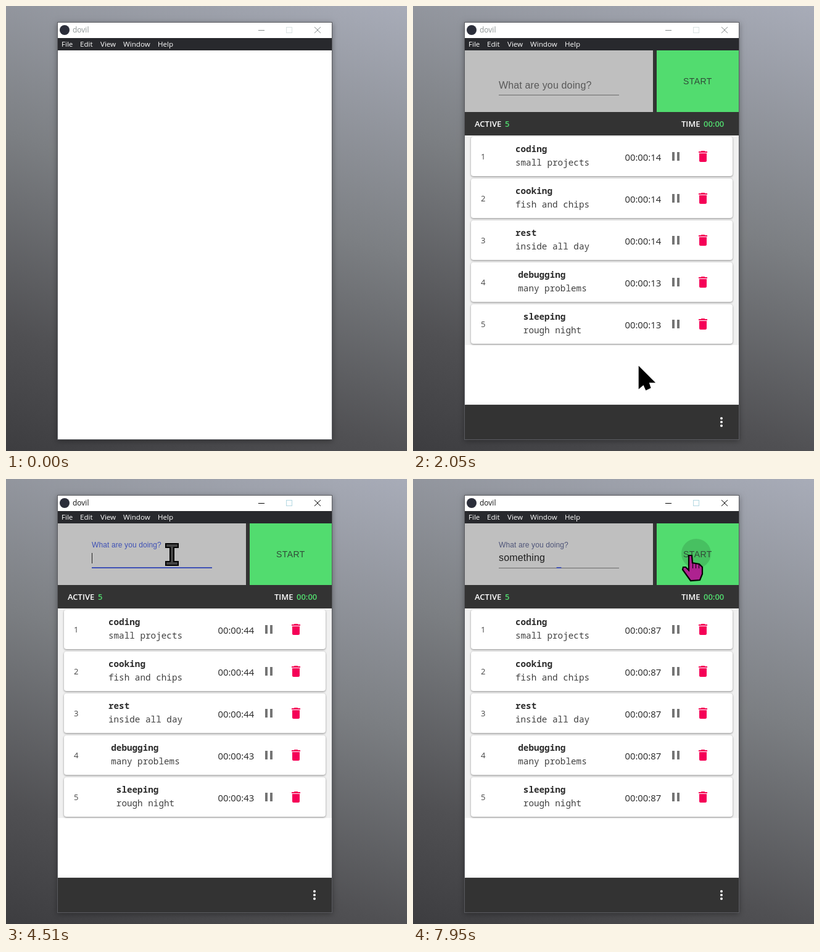
Animation, 650 px wide and 722 px high, one loop 7.99 s. Source, as an HTML page with a canvas:

```html
<!DOCTYPE html>
<html lang="en">
<head>
<meta charset="utf-8">
<title>Time tracker</title>
<style>
html, body { margin: 0; width: 100%; height: 100%; overflow: hidden; background: #6b6c70; }
canvas { display: block; width: 650px; height: 722px; }
</style>
</head>
<body>
<canvas id="stage" width="650" height="722"></canvas>
<script>
const LOOP = 7990;
const ctx = document.getElementById('stage').getContext('2d');
const UI = '"Open Sans", "Noto Sans", sans-serif';
const ARIAL = '"Liberation Sans", Arial, sans-serif';
const MONO = '"Noto Sans Mono", "DejaVu Sans Mono", monospace';
const WIN = { x: 84, y: 27, w: 444, h: 676 };
const CHAR = 8.58;

// Times of the user's actions
const FOCUS = 4150, TYPE = 4880, KEY_GAP = 210, BLUR = 7790;

const tasks = [
  ['coding', 'small projects'],
  ['cooking', 'fish and chips'],
  ['rest', 'inside all day'],
  ['debugging', 'many problems'],
  ['sleeping', 'rough night']
];

// Pointer stops: time, x, y
const stops = [
  [1100, 644, 740], [1210, 626, 710], [2050, 366, 584], [2900, 196, 290], [3330, 260, 149],
  [3500, 269, 123], [6600, 269, 123], [7210, 490, 0], [7300, 538, 56], [7750, 449, 123]
];

const clamp = v => Math.max(0, Math.min(1, v));
const lerp = (a, b, k) => a + (b - a) * k;
const easeOut = v => 1 - (1 - clamp(v)) ** 2;
const mix = (a, b, k) => `rgb(${a.map((v, i) => Math.round(lerp(v, b[i], k))).join(',')})`;
const grey = v => mix([v, v, v], [v, v, v], 0);

function rect(x, y, w, h, color) {
  ctx.fillStyle = color;
  ctx.fillRect(x, y, w, h);
}

function text(str, x, y, font, color, spacing = 0) {
  ctx.font = font;
  ctx.letterSpacing = spacing + 'px';
  ctx.fillStyle = color;
  ctx.fillText(str, x, y);
}

function line(color, x1, y1, x2, y2) {
  ctx.strokeStyle = color;
  ctx.lineWidth = 1;
  ctx.beginPath();
  ctx.moveTo(x1, y1);
  ctx.lineTo(x2, y2);
  ctx.stroke();
}

function disc(x, y, r, color) {
  ctx.fillStyle = color;
  ctx.beginPath();
  ctx.arc(x, y, r, 0, 7);
  ctx.fill();
}

function shape(pts, fill, stroke) {
  ctx.beginPath();
  pts.forEach(p => ctx.lineTo(...p));
  ctx.closePath();
  ctx.fillStyle = fill;
  ctx.fill();
  if (!stroke) return;
  ctx.strokeStyle = '#000';
  ctx.lineWidth = stroke;
  ctx.stroke();
}

function shadow(color, blur, dy) {
  ctx.shadowColor = color;
  ctx.shadowBlur = blur;
  ctx.shadowOffsetY = dy;
}
const noShadow = () => shadow('transparent', 0, 0);

function drawDesktop() {
  const g = ctx.createLinearGradient(650, 0, 389, 841);
  g.addColorStop(0, '#a8acb8');
  g.addColorStop(0.44, '#7c7f83');
  g.addColorStop(0.79, '#505053');
  g.addColorStop(1, '#3d3d40');
  rect(0, 0, 650, 722, g);
}

function drawWindow(active) {
  shadow('rgba(0,0,0,.35)', 9, 2);
  rect(WIN.x - 1, WIN.y - 1, WIN.w + 2, WIN.h + 2, '#5a5b60');
  noShadow();
  rect(WIN.x, WIN.y, WIN.w, WIN.h, '#fff');
  disc(95, 39, 8, '#2b2e3a');
  text('dovil', 108, 43, '12px ' + UI, active ? '#111' : '#8d9494');
  const ink = active ? '#000' : '#858b8b';
  line(ink, 409, 39.5, 419, 39.5);
  line(ink, 500, 34, 510, 44);
  line(ink, 510, 34, 500, 44);
  ctx.strokeStyle = active ? '#b4d8e2' : '#d9e2e2';
  ctx.strokeRect(454.5, 34.5, 9, 9);
  rect(84, 52, 444, 20, '#28292d');
  let x = 90;
  for (const item of ['File', 'Edit', 'View', 'Window', 'Help']) {
    text(item, x, 66, '11.6px ' + UI, '#fff');
    x += Math.round(ctx.measureText(item).width) + 12;
  }
}

function drawField(t) {
  const focus = easeOut((t - FOCUS) / 200);
  const blur = clamp((t - BLUR) / 200);
  const size = 16 - 4 * focus;
  const color = mix([88, 88, 88], [63, 81, 181], focus * (1 - blur * 0.8));
  text('What are you doing?', 139, 134 - 23 * focus, `${size}px ${ARIAL}`, color, size * 0.0094);

  const hover = t > 3450 && t < FOCUS;
  rect(139, hover ? 143 : 144, 195, hover ? 2 : 1, hover ? '#222' : '#6b6b6b');
  const span = 195 * focus * (1 - easeOut(blur));
  rect(236.5 - span / 2, 143, span, 2, '#3f51b5');

  const count = Math.max(0, Math.min(9, 1 + Math.floor((t - TYPE) / KEY_GAP)));
  const word = 'something'.slice(0, count);
  text(word, 139, 133, '16px ' + ARIAL, '#1f1f1f', 0.15);
  const idle = t - (count ? TYPE + (count - 1) * KEY_GAP : FOCUS);
  if (t >= FOCUS && t < BLUR && idle % 1060 < 530)
    rect(139 + Math.round(ctx.measureText(word).width), 120, 1, 17, '#222');
}

function drawHeader(t) {
  rect(84, 72, 444, 138, '#333');
  rect(84, 72, 305, 100, '#bfbfbf');
  rect(395, 72, 133, 100, '#52dc6f');
  drawField(t);
  disc(459, 121, 24 * easeOut((t - BLUR) / 150), 'rgba(0,0,0,.13)');
  text('START', 438, 127, '14px ' + ARIAL, '#314a38', 0.4);
  const font = '600 13px ' + UI;
  text('ACTIVE', 100, 196, font, '#fff');
  text('5', 149, 196, font, '#52dc6f');
  text('TIME', 435, 196, font, '#fff');
  text('00:00', 471, 196, font, '#52dc6f');
}

// The counter starts slowly and settles at 12.6 steps per second.
function elapsed(t) {
  const s = (t - 690) / 1000;
  return 12.6 * s - 4 * (1 - Math.exp(-((s / 1.167) ** 2)));
}

const bin = new Path2D('M6 19c0 1.1.9 2 2 2h8c1.1 0 2-.9 2-2V7H6v12zM19 4h-3.5l-1-1h-5l-1 1H5v2h14V4z');

function drawTask([title, note], i, t, shown) {
  const y = 212 + i * 68;
  ctx.globalAlpha = 1;
  ctx.beginPath();
  ctx.roundRect(94, y, 424, 64, 4);
  ctx.fillStyle = grey(lerp(240, 255, shown));
  shadow(`rgba(0,0,0,${0.42 * shown})`, 3, 1);
  ctx.fill();
  noShadow();

  ctx.globalAlpha = shown;
  text(i + 1, 110, y + 37, '13px ' + UI, '#444');
  const x = 226 - Math.max(title.length, note.length) * CHAR / 2;
  text(title, x, y + 25, '600 14.3px ' + MONO, '#2b2b2b');
  text(note, x, y + 47, '14.3px ' + MONO, '#404040');
  const lag = i < 3 ? 0 : i * 0.1;
  const n = Math.max(0, Math.floor(elapsed(t) - lag));
  text('00:00:' + String(n).padStart(2, '0'), 343.5, y + 39, '14.8px ' + UI, '#222');
  rect(420, y + 25, 4, 14, '#757575');
  rect(428, y + 25, 4, 14, '#757575');
  ctx.save();
  ctx.translate(458, y + 20);
  ctx.fillStyle = '#f50057';
  ctx.fill(bin);
  ctx.restore();
}

function drawScrollbar(shift) {
  rect(84, 686, 444, 17, '#f1f1f1');
  rect(101, 688, 410 * 444 / (444 + shift), 13, '#c1c1c1');
  shape([[95, 691], [91, 694.5], [95, 698]], '#a3a3a3');
  shape([[518, 691], [522, 694.5], [518, 698]], '#505050');
}

function drawPage(t) {
  if (t < 370) return;
  // The first paints come in two hard steps.
  if (t < 650) t = t < 510 ? 370 : 510;
  let shift = 60 * Math.exp((370 - t) / 320);
  if (shift < 0.5) shift = 0;
  ctx.save();
  ctx.beginPath();
  ctx.rect(84, 72, 444, 631);
  ctx.clip();

  ctx.save();
  ctx.translate(shift, 0);
  ctx.globalAlpha = 1 - Math.exp((370 - t) / 150);
  drawHeader(t);
  if (t >= 650) {
    const shown = clamp((t - 650) / 750);
    rect(84, 210, 444, 340, '#f0f0f0');
    ctx.translate(-10 * (1 - shown), 0);
    tasks.forEach((task, i) => drawTask(task, i, t, shown));
  }
  ctx.restore();

  const top = shift ? 630 : 647;
  shadow('rgba(0,0,0,.2)', 4, 0);
  rect(84, top, 444, 56, '#333');
  noShadow();
  for (let dy = 22; dy <= 34; dy += 6) disc(500, top + dy, 2, '#fff');
  if (shift) drawScrollbar(shift);
  ctx.restore();
}

const cursors = {
  arrow(t) {
    const light = clamp((Math.abs(t - 2300) - 300) / 700);
    const g = ctx.createLinearGradient(0, 18, 4, 30);
    g.addColorStop(0, grey(72 * light));
    g.addColorStop(1, grey(215 * light));
    shape([[1, 3], [1, 35], [8, 29], [12, 38], [18, 35], [15, 26], [24, 26]], g, 2.6);
  },
  beam() {
    for (const [pad, color] of [[0, '#000'], [2, '#444']]) {
      for (const y of [-19, 10]) rect(-11 + pad, y + pad, 22 - 2 * pad, 8 - 2 * pad, color);
      rect(-4 + pad, -19 + pad, 8 - 2 * pad, 37 - 2 * pad, color);
    }
  },
  bars() {
    rect(-3, -20, 6, 40, '#000');
    rect(-1, -20, 2, 40, '#aaa');
  },
  hand() {
    shape([[-2, 1], [3, 1], [4, 13], [15, 15], [20, 20], [20, 31], [16, 41], [1, 42],
      [-12, 24], [-11, 20], [-7, 20], [-2, 25]], '#ae2290', 2.2);
    for (let x = 4.5; x < 15; x += 5) line('#000', x, 14, x, 22);
  }
};

const within = (x, y, l, t, r, b) => x >= l && x < r && y >= t && y < b;

function cursorAt(x, y) {
  if (y < 20) return cursors.bars;
  if (within(x, y, 139, 100, 334, 147)) return cursors.beam;
  if (within(x, y, 395, 72, 528, 172)) return cursors.hand;
  return cursors.arrow;
}

function drawPointer(t) {
  if (t < stops[0][0]) return;
  const last = stops[stops.length - 1];
  const n = stops.findIndex(s => s[0] > t);
  const a = n < 0 ? last : stops[n - 1], b = n < 0 ? last : stops[n];
  const k = clamp((t - a[0]) / (b[0] - a[0] || 1));
  const x = Math.round(lerp(a[1], b[1], k)), y = Math.round(lerp(a[2], b[2], k));
  ctx.save();
  ctx.translate(x, y);
  cursorAt(x, y)(t);
  ctx.restore();
}

let start;
function frame(now) {
  start ??= now;
  const t = (now - start) % LOOP;
  drawDesktop();
  drawWindow(t >= FOCUS);
  drawPage(t);
  drawPointer(t);
  requestAnimationFrame(frame);
}
requestAnimationFrame(frame);
</script>
</body>
</html>
```
